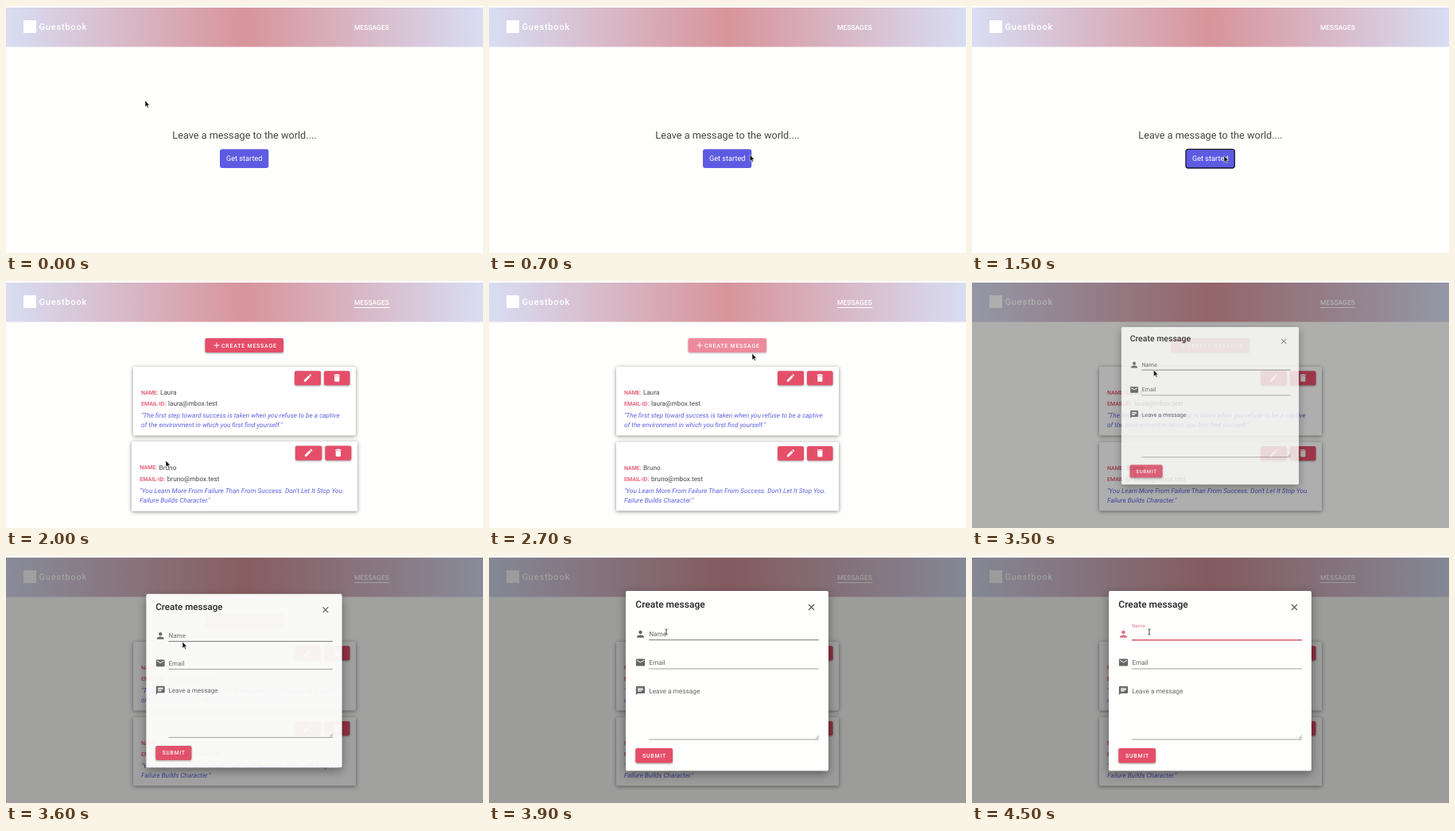
An HTML page for the animation above (5 s loop, 600 by 311 pixels).

```html
<!DOCTYPE html>
<html lang="en">
<head>
<meta charset="utf-8">
<title>Guestbook</title>
<style>
  html, body { margin: 0; width: 100%; height: 100%; overflow: hidden; background: #fefefd; }
  svg { display: block; font-family: Roboto, sans-serif; font-size: 8.2px; fill: #444; text-rendering: geometricPrecision; }
  .white { fill: #fff; }
  .medium { font-weight: 500; }
  .caps { font-weight: 500; font-size: 7px; letter-spacing: .77px; fill: #fff; }
  .key { font-weight: 500; font-size: 7px; fill: #e44c68; }
  .quote { font-style: italic; fill: #5f5ee0; }
  .red { fill: #e54e69; filter: drop-shadow(0 1px 1.2px rgba(0,0,0,.38)); }
  .card { fill: #fff; filter: drop-shadow(0 1px 2.6px rgba(0,0,0,.45)); }
  .sheet { fill: #fefefd; filter: drop-shadow(0 4px 6px rgba(0,0,0,.4)); }
  .field { font-size: 8.3px; fill: #666; }
  .line { stroke: #8a8a8a; stroke-width: .8; }
</style>
</head>
<body>
<svg id="stage" width="600" height="311" viewBox="0 0 600 311"></svg>
<script>
const paths = {
  add: 'M19 13h-6v6h-2v-6H5v-2h6V5h2v6h6v2z',
  edit: 'M3 17.25V21h3.75L17.81 9.94l-3.75-3.75L3 17.25zM20.71 7.04c.39-.39.39-1.02 0-1.41l-2.34-2.34c-.39-.39-1.02-.39-1.41 0l-1.83 1.83 3.75 3.75 1.83-1.83z',
  trash: 'M6 19c0 1.1.9 2 2 2h8c1.1 0 2-.9 2-2V7H6v12zM19 4h-3.5l-1-1h-5l-1 1H5v2h14V4z',
  person: 'M12 12c2.21 0 4-1.79 4-4s-1.79-4-4-4-4 1.79-4 4 1.79 4 4 4zm0 2c-2.67 0-8 1.34-8 4v2h16v-2c0-2.66-5.33-4-8-4z',
  mail: 'M20 4H4c-1.1 0-2 .9-2 2v12c0 1.1.9 2 2 2h16c1.1 0 2-.9 2-2V6c0-1.1-.9-2-2-2zm0 4l-8 5-8-5V6l8 5 8-5v2z',
  chat: 'M20 2H4c-1.1 0-2 .9-2 2v18l4-4h14c1.1 0 2-.9 2-2V4c0-1.1-.9-2-2-2zM6 9h12v2H6V9zm8 5H6v-2h8v2zm4-6H6V6h12v2z'
};

// Markup helpers; icons are placed by their centre.
const icon = (name, x, y, size, attrs = '') =>
  `<path d="${paths[name]}" transform="translate(${x - size / 2} ${y - size / 2}) scale(${size / 24})" ${attrs}/>`;
const text = (x, y, str, attrs = '') => `<text x="${x}" y="${y}" ${attrs}>${str}</text>`;
const rect = (x, y, w, h, r, attrs) => `<rect x="${x}" y="${y}" width="${w}" height="${h}" rx="${r}" ${attrs}/>`;
const line = (x1, x2, y, attrs = 'class="line"') => `<path d="M${x1} ${y}H${x2}" ${attrs}/>`;

const card = (id, y, name, mail, quote) => `<g id="${id}">
  ${rect(160, y, 280, 86.5, 1.5, 'class="card"')}
  ${rect(363, y + 5.3, 33, 18, 2, 'class="red"')}${icon('edit', 379.5, y + 14, 12.5, 'class="white"')}
  ${rect(400, y + 5.3, 32.5, 18, 2, 'class="red"')}${icon('trash', 416.3, y + 14, 12.5, 'class="white"')}
  ${text(170, y + 34.8, 'NAME:', 'class="key"')}${text(194, y + 35, name)}
  ${text(170, y + 49.2, 'EMAIL-ID:', 'class="key"')}${text(204, y + 49.4, mail)}
  ${quote.map((str, i) => text(170, y + 64 + 12 * i, str, 'class="quote"')).join('')}
</g>`;

stage.innerHTML = `
<defs><linearGradient id="sky">
  <stop stop-color="#d8ddf3"/><stop offset=".5" stop-color="#d8949b"/><stop offset="1" stop-color="#d8ddf3"/>
</linearGradient></defs>
${rect(0, 2, 600, 49.5, 0, 'fill="url(#sky)"')}
${rect(22, 18, 16, 16, 0, 'class="white"')}
${text(41.5, 30, 'Guestbook', 'class="white medium" font-size="11" letter-spacing=".8"')}
${text(438, 30, 'MESSAGES', 'class="white medium" font-size="8.5"')}

<g id="home" text-anchor="middle">
  ${text(300, 167.3, 'Leave a message to the world....', 'font-size="12.7"')}
  ${rect(269, 180.3, 61.3, 23.7, 3, 'id="start" fill="#5e5be3"')}
  ${text(299.7, 195.2, 'Get started', 'class="white" font-size="9.2"')}
</g>

<g id="messages">
  ${line(438, 482.5, 33.5, 'stroke="#fff"')}
  <g id="create">
    ${rect(250.5, 72, 98.5, 18, 2, 'class="red"')}
    ${icon('add', 265, 81, 12, 'class="white"')}
    ${text(271, 83.5, 'CREATE MESSAGE', 'class="caps"')}
  </g>
  ${card('card0', 108, 'Laura', 'laura@mbox.test', [
    '"The first step toward success is taken when you refuse to be a captive',
    'of the environment in which you first find yourself."'])}
  ${card('card1', 202.7, 'Bruno', 'bruno@mbox.test', [
    '"You Learn More From Failure Than From Success. Don\'t Let It Stop You.',
    'Failure Builds Character."'])}
</g>

<g id="modal">
  ${rect(0, 2, 600, 309, 0, 'id="shade" fill="#000"')}
  <g id="dialog">
    ${rect(172, 44, 255, 226.5, 2, 'class="sheet"')}
    ${text(184.3, 64.6, 'Create message', 'class="medium" font-size="12" fill="#222"')}
    <path d="M402 61l7 7m0-7l-7 7" stroke="#555" stroke-width="1.1"/>
    ${icon('person', 190.5, 98.3, 13.5, 'id="person"')}
    ${icon('mail', 190.5, 134, 13.5, 'fill="#666"')}
    ${icon('chat', 190.5, 169.5, 13.5, 'fill="#666"')}
    <text id="label">Name</text>
    ${text(201.2, 137, 'Email', 'class="field"')}
    ${text(201.2, 172.5, 'Leave a message', 'class="field"')}
    ${line(201, 415, 105.7, 'stroke="#777" stroke-width="1"')}
    <path id="ink" stroke="#e0607a" stroke-width="1.4"/>
    ${line(201, 415, 142)}
    ${line(201, 415, 231)}
    <path d="M411 230l4-4m-2 4l2-2" stroke="#777" stroke-width=".6"/>
    ${rect(184.3, 242, 46.7, 18.5, 2, 'class="red"')}
    ${text(193, 253.8, 'SUBMIT', 'class="caps"')}
  </g>
</g>

<path id="arrow" d="M0 0V8.2L1.9 6.4 3.2 9.2 4.5 8.6 3.2 5.9H5.6Z" fill="#111" stroke="#fff" stroke-width=".5"/>
<path id="beam" d="M-1.5-3.5Q0-3.5 0-2.5 0-3.5 1.5-3.5M0-2.5V2.5M-1.5 3.5Q0 3.5 0 2.5 0 3.5 1.5 3.5" fill="none" stroke="#333" stroke-width=".9"/>`;

// Pointer track: time, x, y
const track = [
  [0, 175, 119], [600, 331, 187], [1100, 317, 188.5], [1600, 317, 188.5], [2000, 201, 226],
  [2400, 424, 119], [2800, 300, 82], [3300, 285, 84], [3400, 252, 106], [3500, 228.5, 112],
  [3600, 222, 108], [3800, 223, 95.5], [5000, 223, 95.5]
];
const el = id => document.getElementById(id);
const set = (id, attrs) => { for (const k in attrs) el(id).setAttribute(k, attrs[k]); };
const show = (id, on) => set(id, { visibility: on ? 'visible' : 'hidden' });
const clamp = v => Math.max(0, Math.min(1, v));
const grow = (x, y, s) => `translate(${x} ${y}) scale(${s}) translate(${-x} ${-y})`;

function pointer(t) {
  const i = track.findIndex(p => p[0] > t);
  const [a, b] = [track[i - 1], track[i]];
  const k = (t - a[0]) / (b[0] - a[0]);
  return [a[1] + (b[1] - a[1]) * k, a[2] + (b[2] - a[2]) * k];
}

function draw(t) {
  show('home', t < 1600);
  show('messages', t >= 1600);
  set('start', { stroke: t >= 1300 ? '#15152a' : 'none', 'stroke-width': 1.3 });

  const hover = t < 1900 ? 0 : t < 2200 ? 1 : t < 2400 ? 0 : -1;
  [108, 202.7].forEach((y, i) =>
    set('card' + i, { transform: grow(300, y + 43, hover === i ? 1.014 : 1) }));
  set('create', { opacity: t >= 2700 ? .65 : 1 });

  // The dialog settles with a quadratic ease-out.
  const rest = clamp((3710 - t) / 326) ** 2;
  show('modal', t >= 3500);
  set('shade', { opacity: .39 - .17 * rest });
  set('dialog', { opacity: 1 - .45 * rest, transform: grow(299.5, 157, 1 - .3 * rest) });

  const focus = clamp((t - 4200) / 300);
  const float = 1 - (1 - focus) ** 2;
  set('label', {
    x: 201.2, y: 101 - 11 * float, 'font-size': 8.3 - 2.1 * float,
    fill: focus ? '#e27f90' : '#666'
  });
  set('person', { fill: focus ? '#d9738a' : '#666' });
  set('ink', { d: `M${308 - 107 * float} 105.7H${308 + 107 * float}` });

  const [x, y] = pointer(t);
  show('arrow', t < 3800);
  show('beam', t >= 3800);
  for (const id of ['arrow', 'beam']) set(id, { transform: `translate(${x} ${y})` });
}

const began = performance.now();
(function tick() {
  draw(Math.min(4500, Math.floor((performance.now() - began) % 5000 / 100) * 100));
  requestAnimationFrame(tick);
})();
</script>
</body>
</html>
```
